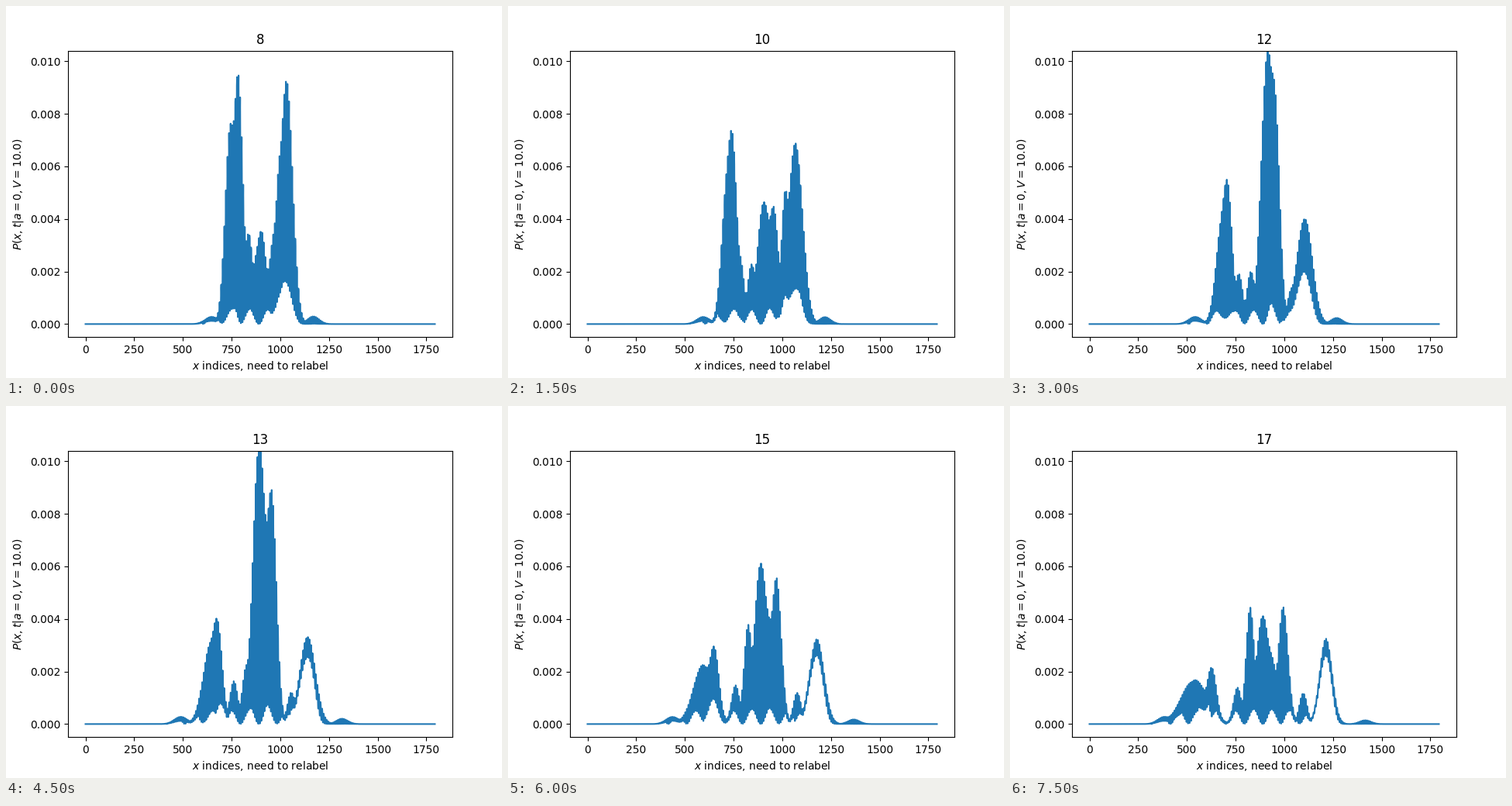
A matplotlib script for the animation above (8 s loop, 640 px wide and 480 px high).

```python
import numpy as np
import matplotlib.pyplot as plt
from matplotlib.animation import FuncAnimation

plt.rcParams["text.kerning_factor"] = 6

N = 1795          # lattice sites
STEPS = 16
PERIOD = 8.1      # fringe spacing in sites
x = np.arange(N)


def bump(centre, height, width, power=2):
    return height * np.exp(-np.abs((x - centre) / width) ** power)


def sigmoid(u):
    return 1 / (1 + np.exp(-u))


def merge(bumps):
    """Soft maximum: keeps the valleys between overlapping bumps."""
    return np.sum(np.power(bumps, 4), axis=0) ** .25


def left_front(k):
    return 745 - 7 * k - .45 * k ** 2


def right_crest(k):
    return 1031 + 12.2 * k


def left_packet(k):
    fade = np.exp(-.1 * k)
    return [
        bump(648 - 17.6 * k, .28, 48),
        bump(left_front(k), 7.6 * fade, 38 + .25 * k ** 2),
        bump(782 - 14 * k + .24 * k ** 2, 9.7 * fade, 36),
        bump(760 + 78 * np.exp(-k / 2.5), 1.3 + 2.2 * np.exp(-k / 5), 30),
    ]


def centre_packet(k):
    surge = np.interp(k, [0, 3, 6, 9, 11, 12, 13, 15],
                      [2.9, 4.6, 10.2, 10.6, 13.5, 6.1, 7, 4.1])
    drift = 30 * np.exp(-((k - 5) / 2.5) ** 2)
    inner = 1.8 + 1.4 * np.exp(-k / 3) + 2.7 * sigmoid(k - 11)
    return [
        bump(825 + 80 * np.exp(-k / 2), inner, 30),
        bump(890 + drift, surge, 46),
        bump(930, .65 * surge, 45),
        bump(950 + .55 * (k - 6) ** 2, surge * (.82 + .0057 * (k - 8) ** 2), 36),
    ]


def right_packet(k):
    return [
        bump(995 + 6.8 * k, 1.2 + 4.5 * sigmoid(8 - 2 * k), 28),
        bump(right_crest(k), 3.25 + 6.1 * np.exp(-(k / 4.2) ** 2),
             45 + 12 * np.sin(np.pi * k / 15)),
        bump(1170 + 16.4 * k, .3 - .01 * k, 42),
    ]


def density(k):
    high = merge(left_packet(k) + centre_packet(k) + right_packet(k))

    # The troughs stay near zero except where one wave dominates.
    scallop = .5 * np.sin(np.pi * (x - 985) / 95) ** 2
    lobe = bump(left_front(k) + 50, .08 * k, 32)
    share = bump(right_crest(k) - 15, .16 + .64 * sigmoid(k - 6), 80, 4)
    low = np.minimum(np.maximum(scallop, lobe), .4 * high)
    low = np.maximum(low * (x < right_crest(k) - 40), share * high)

    fringe = (1 + np.cos(2 * np.pi * x / PERIOD)) / 2
    return (low + (high - low) * fringe) * 1e-3


fig, ax = plt.subplots(figsize=(6.4, 4.8), dpi=100)
line, = ax.plot(x, density(0))
ax.set_xlim(-.05 * (N - 1), 1.05 * (N - 1))
ax.set_ylim(-.000496, .010406)
ax.set_xlabel("$x$ indices, need to relabel")
ax.set_ylabel("$P(x,t|a=0,V=10.0)$")
title = ax.set_title("8")


def update(k):
    line.set_ydata(density(k))
    title.set_text(str(int(8.97 + .55 * k)))
    return line, title


anim = FuncAnimation(fig, update, frames=STEPS, interval=500,
                     repeat=True, repeat_delay=0, blit=False)
plt.show()
```
